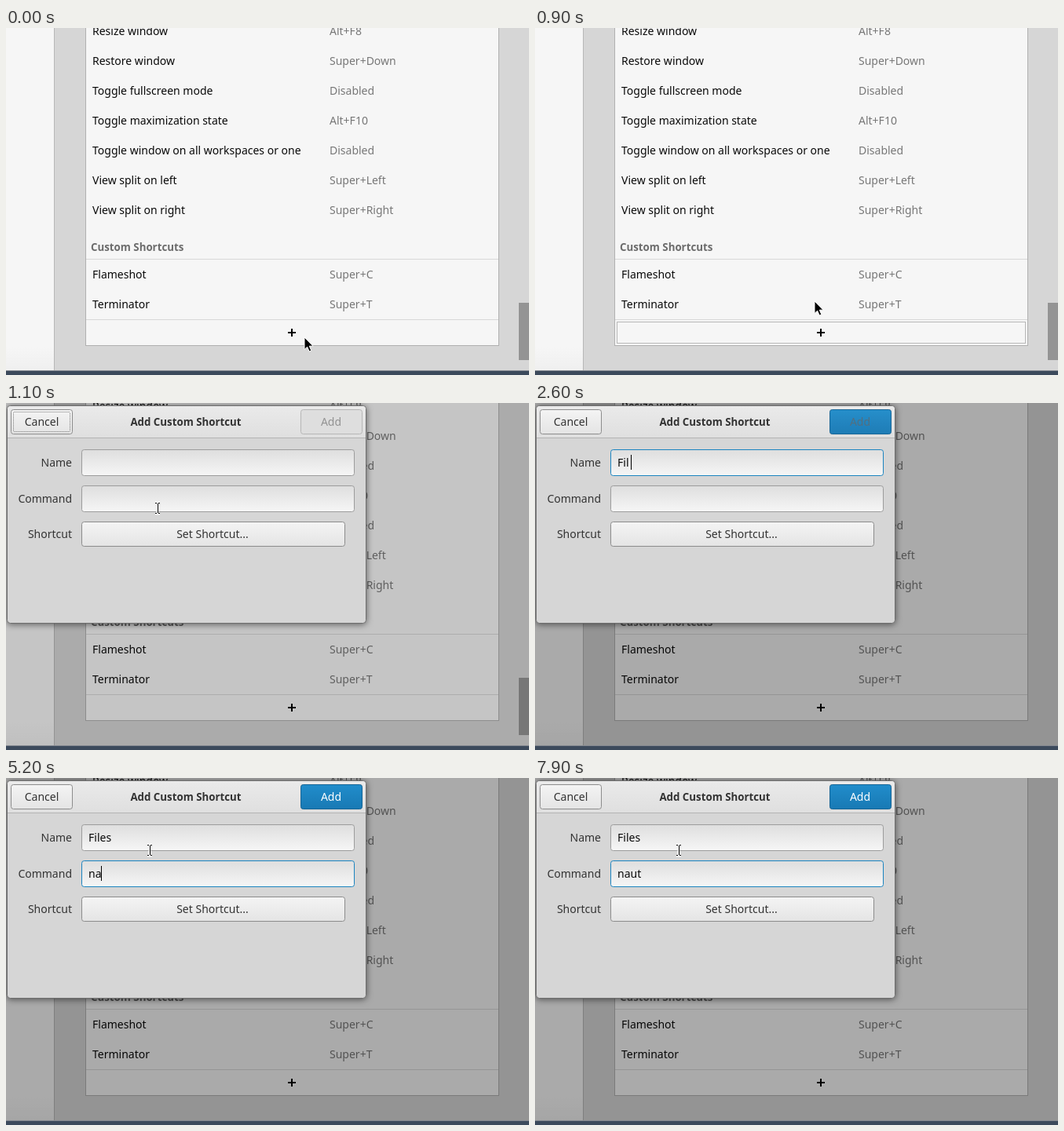
Recreate the animation shown at these times as an HTML page. Size 666 px wide and 442 px high, loop 8000 ms.

```html
<!DOCTYPE html>
<html lang="en">
<head>
<meta charset="utf-8">
<title>Add Custom Shortcut</title>
<style>
  html, body { margin: 0; width: 100%; height: 100%; overflow: hidden; background: #d6d6d6; }
  svg { display: block; width: 666px; height: 442px; }
  text { font: 14px "Noto Sans", sans-serif; fill: #0a0a0a; white-space: pre; }
  .value { fill: #777; }
  .bold { font-weight: 700; font-size: 13.3px; }
  .label { fill: #333; text-anchor: end; }
  .mid { fill: #333; text-anchor: middle; }
  .line { shape-rendering: crispEdges; }
  .dots { fill: none; stroke: #777; stroke-dasharray: 1 1; }
  .button { fill: url(#button); stroke: #8c8c8c; }
  .entry { fill: url(#entry); stroke: #9c9c9c; }
  .entry.focus { stroke: #1b84c0; }
  .shadow { filter: drop-shadow(0 1px 4px rgba(0, 0, 0, .55)); }
</style>
</head>
<body>
<svg viewBox="0 0 666 442">
  <defs>
    <linearGradient id="button" x2="0" y2="1">
      <stop stop-color="#f4f4f4"/><stop offset="1" stop-color="#e4e4e4"/>
    </linearGradient>
    <linearGradient id="entry" x2="0" y2="1">
      <stop stop-color="#dedede"/><stop offset="1" stop-color="#f6f6f6"/>
    </linearGradient>
    <linearGradient id="header" x2="0" y2="1">
      <stop stop-color="#eaeaea"/><stop offset="1" stop-color="#dfdfdf"/>
    </linearGradient>
    <linearGradient id="blue" x2="0" y2="1">
      <stop stop-color="#218dcb"/><stop offset="1" stop-color="#1879b4"/>
    </linearGradient>
    <linearGradient id="pane" x2="0" y2="1">
      <stop offset=".93" stop-color="#f6f6f6"/><stop offset="1" stop-color="#efefef"/>
    </linearGradient>
  </defs>

  <!-- settings window -->
  <rect width="666" height="442" fill="#d6d6d6"/>
  <rect width="61" height="437" fill="url(#pane)"/>
  <rect class="line" x="61" width="1" height="437" fill="#b8b8b8"/>
  <rect x="101.5" y="-5.5" width="526" height="410" fill="#f6f6f6" stroke="#b0b0b0"/>
  <path class="line" d="M102 294.5H627M102 371.5H627" stroke="#d8d8d8"/>
  <g id="rows"></g>
  <text class="bold" x="108" y="284" style="fill:#6c6c6c">Custom Shortcuts</text>
  <path class="line" d="M359 388H369M364 383V393" stroke="#000" stroke-width="2"/>
  <rect id="rowFocus" class="dots" x="104.5" y="374.5" width="520" height="27"/>
  <rect id="slider" x="653" y="350" width="13" height="73" fill="#949494"/>
  <rect id="dim" width="666" height="437"/>
  <rect y="436" width="666" height="1" fill="#838890"/>
  <rect y="437" width="666" height="5" fill="#3c4a5c"/>

  <!-- dialog -->
  <g id="dialog">
    <rect class="shadow" x="1.5" y="3.5" width="457" height="277" rx="4" fill="#d6d6d6" stroke="#6e6e6e"/>
    <path d="M2 44V8Q2 4 6 4H454Q458 4 458 8V44Z" fill="url(#header)"/>
    <path class="line" d="M2 44.5H458" stroke="#b4b4b4"/>
    <rect class="button" x="6.5" y="8.5" width="78" height="31" rx="3"/>
    <rect id="cancelFocus" class="dots" x="9.5" y="11.5" width="72" height="25" rx="1"/>
    <text class="mid" x="45.5" y="29">Cancel</text>
    <text class="mid bold" x="229" y="28.5">Add Custom Shortcut</text>
    <rect x="375.5" y="8.5" width="78" height="31" rx="3" fill="#dedede" stroke="#b6b6b6"/>
    <rect id="addBlue" x="375.5" y="8.5" width="78" height="31" rx="3" fill="url(#blue)" stroke="#176596"/>
    <text id="addText" class="mid" x="414" y="29">Add</text>
    <text class="label" x="84" y="81">Name</text>
    <text class="label" x="84" y="127">Command</text>
    <text class="label" x="84" y="172">Shortcut</text>
    <rect id="nameBox" class="entry" x="96.5" y="59.5" width="347" height="33" rx="3"/>
    <rect id="commandBox" class="entry" x="96.5" y="105.5" width="347" height="33" rx="3"/>
    <text id="nameText" x="105" y="81"></text>
    <text id="commandText" x="105" y="127"></text>
    <rect id="caret" class="line" width="1" height="19"/>
    <rect class="button" x="96.5" y="151.5" width="335" height="31" rx="3"/>
    <text class="mid" x="263" y="172">Set Shortcut...</text>
  </g>

  <path id="arrow" d="M0 0V15.5L3.6 12.2L6.2 18L8.8 16.9L6.3 11.2H11Z" stroke="#fff"/>
  <g id="beam" fill="none">
    <path d="M-3 -7H3M0 -7V7M-3 7H3" stroke="#fff" stroke-width="3" opacity=".8"/>
    <path class="line" d="M-3 -6.5H-1M1 -6.5H3M.5 -6V6M-3 6.5H-1M1 6.5H3" stroke="#000"/>
  </g>
</svg>
<script>
const LOOP = 8000;
const $ = id => document.getElementById(id);

const rows = [
  ['Resize window', 'Alt+F8'],
  ['Restore window', 'Super+Down'],
  ['Toggle fullscreen mode', 'Disabled'],
  ['Toggle maximization state', 'Alt+F10'],
  ['Toggle window on all workspaces or one', 'Disabled'],
  ['View split on left', 'Super+Left'],
  ['View split on right', 'Super+Right'],
  ['Flameshot', 'Super+C'],
  ['Terminator', 'Super+T']
];
$('rows').innerHTML = rows.map(([name, keys], i) => {
  const y = i < 7 ? 9 + 38 * i : 319 + 38 * (i - 7);
  return `<text x="110" y="${y}">${name}</text><text class="value" x="412" y="${y}">${keys}</text>`;
}).join('');

// Each track lists [start time, ...values], held until the next entry.
const pointer = [
  [0, 'arrow', 380, 394], [300, 'arrow', 379, 393], [400, 'arrow', 377, 391],
  [500, 'arrow', 374, 388], [600, 'arrow', 371, 386], [700, 'arrow', 370, 385],
  [900, 'arrow', 356, 348], [1000, 'arrow', 338, 302], [1100, 'beam', 193, 134],
  [1200, 'beam', 186, 108], [1300, 'beam', 183, 92], [2000, ''], [4000, 'beam', 183, 92]
];
const dim = [[0, 0], [1000, .1], [1100, .2], [1200, .31]];
const slider = [[0, 1], [1600, .6], [2000, .25], [2100, 0]];
const add = [[0, 0, '#929292'], [2000, .5, '#7b8a92'], [2100, .97, '#526f80'], [5200, 1, '#fff']];
const nameTyped = [[0, ''], [2000, 'F'], [2400, 'Fi'], [2600, 'Fil'], [3000, 'File'], [3500, 'Files']];
const commandTyped = [[0, ''], [5200, 'na'], [6100, 'nau'], [6700, 'naut']];
const caret = [
  [0, 0], [1300, 105], [2000, 114], [2400, 118], [2600, 122], [3000, 130], [3500, 137],
  [4000, 105], [4300, 0], [4700, 105], [5200, 121], [6100, 129], [6700, 134], [7900, 0]
];

const at = (track, t) => track.findLast(step => step[0] <= t).slice(1);
const show = (id, on) => $(id).style.display = on ? '' : 'none';

function render(t) {
  const [kind, x, y] = at(pointer, t);
  for (const id of ['arrow', 'beam']) {
    show(id, id === kind);
    if (id === kind) $(id).setAttribute('transform', `translate(${x} ${y})`);
  }

  show('rowFocus', t >= 700 && t < 1000);
  show('dialog', t >= 1000);
  show('cancelFocus', t < 1300);
  $('dim').style.opacity = at(dim, t)[0];
  $('slider').style.opacity = at(slider, t)[0];

  const [blue, ink] = at(add, t);
  $('addBlue').style.opacity = blue;
  $('addText').style.fill = ink;

  const inCommand = t >= 4000;
  $('nameBox').classList.toggle('focus', t >= 1300 && !inCommand);
  $('commandBox').classList.toggle('focus', inCommand);
  $('nameText').textContent = at(nameTyped, t)[0];
  $('commandText').textContent = at(commandTyped, t)[0];

  const [caretX] = at(caret, t);
  show('caret', caretX);
  $('caret').setAttribute('x', caretX);
  $('caret').setAttribute('y', inCommand ? 112 : 66);
}

let start;
function tick(now) {
  start ??= now;
  render((now - start) % LOOP);
  requestAnimationFrame(tick);
}
render(0);
requestAnimationFrame(tick);
</script>
</body>
</html>
```
